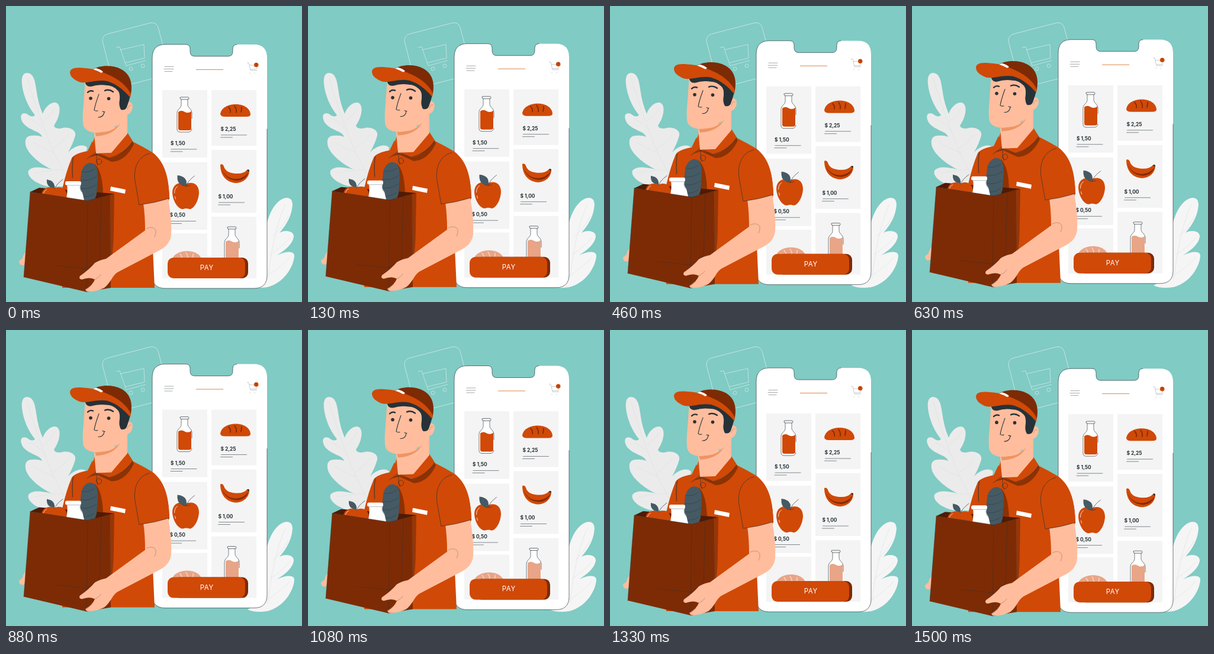
Write an HTML page that moves like this. It is 500x500 px and loops after 1540 ms.

```html
<!DOCTYPE html>
<html lang="en">
<head>
<meta charset="utf-8">
<title>Grocery delivery</title>
<style>
html, body { margin: 0; width: 100%; height: 100%; overflow: hidden; background: #80cbc4; }
svg { display: block; width: 100vw; height: 100vh; }
.o { fill: #d04907; }
.b { fill: #7d2b05; }
.d { fill: #263238; }
.g { fill: #455a64; }
.s { fill: #ffbd9d; }
.w { fill: #fff; }
.pale { fill: #e8a587; }
.card { fill: #f4f4f4; }
.shade { fill: #8c3204; }
.ln { fill: none; stroke: #263238; stroke-width: .65; stroke-linecap: round; stroke-linejoin: round; }
.soft { fill: none; stroke: #dcdfdf; stroke-width: .6; }
.icon { fill: none; stroke: #cfe9e6; stroke-width: .8; }
text { font-family: Inter, "Open Sans", sans-serif; }
.price { font-size: 8.4px; font-weight: 650; fill: #263238; }
.pay { font-size: 11.4px; letter-spacing: .6px; }
</style>
</head>
<body>
<svg id="stage" viewBox="0 0 500 500" xmlns="http://www.w3.org/2000/svg"></svg>
<script>
const LOOP = 1540, LOWEST = 1485, RISE = 8.9;

const path = (cls, d, extra = '') => `<path class="${cls}" d="${d}" ${extra}/>`;
const rect = (cls, x, y, w, h, r = 0) =>
  `<rect class="${cls}" x="${x}" y="${y}" width="${w}" height="${h}" rx="${r}"/>`;
const dot = (cls, x, y, r) => `<circle class="${cls}" cx="${x}" cy="${y}" r="${r}"/>`;
const shift = (x, y, body) => `<g transform="translate(${x} ${y})">${body}</g>`;

const bottle = liquid =>
  path('w', 'M6 4H19V13C19 19 25 20 25 27V55Q25 59 20 59H5Q0 59 0 55V27C0 20 6 19 6 13Z') +
  path(liquid, 'M2 25Q7 21 13 25Q19 28 24 24V53Q24 56 20 56H6Q2 56 2 53Z') +
  path('ln', 'M5 1Q5 0 7 0H18Q20 0 20 2Q20 4 18 4H7Q5 4 5 1M7 4V13C7 19 0 20 0 27V54Q0 59 5 59H19Q24 59 25 54M18 4V13C18 18 25 20 25 27V36');

const bread = (fill, cut) =>
  path(fill, 'M0 16C2 5 14 0 26 0C39 0 50 6 51 17Q51 21 44 21H8Q0 21 0 16Z') +
  path('', 'M14 5Q18 9 17 14M24 3Q28 8 27 14M36 5Q36 9 35 13',
    `fill="none" stroke="${cut}" stroke-width="1.7" stroke-linecap="round"`);

const apple =
  path('o', 'M23 15C30 11 45 11 45.5 29C45 44 36 58 29 57Q24 55 19 57C10 58 1 43 .5 29C1 12 16 11 23 15Z') +
  path('g', 'M9 0Q8 12 15 16Q20 18 24 17Q26 7 19 3Q14 0 9 0Z') +
  path('ln', 'M24 18Q26 10 38 1M18 17Q24 20 30 17') +
  path('', 'M4 30Q4 22 9 19M5 36L6 40', 'fill="none" stroke="#fff" stroke-width=".8" stroke-linecap="round"');

const banana =
  path('o', 'M362 268Q366 266 368 271C371 281 381 283 391 283Q402 283 407 277Q410 275 411 278C411 289 402 299 388 299C372 298 362 286 362 268Z') +
  path('b', 'M364 275C369 287 379 293 391 292Q404 290 410 280C407 289 401 294 390 295C377 294 368 287 364 275Z') +
  path('d', 'M407 277Q410 275 411 278L410 280Z');

const price = (x, y, label) =>
  `<text class="price" x="${x}" y="${y}">${label}</text>` +
  path('ln', `M${x + 1} ${y + 7}h43M${x} ${y + 11}h20`, 'stroke-opacity=".85"');

const cards = [
  [264, 142, 114], [264, 264, 114], [264, 384, 76],
  [347, 142, 94], [347, 243, 106], [347, 356, 104]
].map(([x, y, h]) => rect('card', x, y, 76, h)).join('');

function leaves() {
  return path('', 'M35 113C46 113 49 125 51 140Q54 164 62 182C66 170 78 160 86 164C94 169 91 188 81 202Q83 209 96 206C108 204 119 210 117 219Q113 233 105 247C116 236 130 232 137 239L125 305H72C55 302 34 290 38 278Q45 268 77 276C60 268 40 253 34 238Q29 220 43 219Q54 218 61 221C58 211 40 211 29 198C22 187 25 179 35 182Q45 190 49 184C40 174 29 153 27 132Q25 114 35 113Z', 'fill="#ebebeb"') +
    path('soft', 'M36 122C48 165 64 205 77 240Q91 270 104 290M63 194Q76 186 83 172M40 190Q55 196 67 212M78 241Q94 232 105 217M45 230Q65 242 82 248M48 282Q75 277 97 276') +
    path('', 'M408 472C425 465 431 440 434 415C436 365 449 333 469 325Q483 321 484 335C483 352 476 367 462 383C472 377 487 380 486 390C484 402 472 412 458 421C472 414 487 413 487 422C486 440 470 468 441 475Q420 478 408 472Z', 'fill="#f5f5f5"') +
    path('soft', 'M472 335C459 363 450 400 442 462M450 390Q464 378 477 355M446 420Q465 408 480 391M441 456Q464 442 480 424');
}

function cartTile() {
  return `<rect class="icon" x="170.5" y="36.5" width="97" height="92" rx="11" transform="rotate(-14.5 219 82.5)"/>` +
    path('icon', 'M186 70L192 69L203 101L236 92M193 74L233 65L234 88L201 96') +
    dot('icon', 211, 106, 3) + dot('icon', 231, 101, 3);
}

function phone() {
  const outline = 'M441 208V455Q441 477 419 477H269Q247 477 247 455V88Q247 65 269 65H304Q311 65 311 73V77Q311 85 319 85H375Q383 85 383 77V73Q383 65 390 65';
  return path('w', outline + 'H419Q441 65 441 88Z') + path('ln', outline) +
    path('ln', 'M268 102.5h15M267 106.5h16M268 110.5h13', 'stroke-opacity=".65"') +
    path('', 'M321 107.5h46', 'stroke="#dc864f" stroke-width="1"') +
    path('soft', 'M407 96h3l3 13h11M411 100h13l-1 7h-10', 'style="stroke:#aaa"') +
    dot('soft', 412, 113.5, 1.1) + dot('soft', 420, 113.5, 1.1) +
    dot('o', 422.7, 99.5, 3.8) +
    '<text x="422.7" y="101.2" font-size="4.5" text-anchor="middle" fill="#5a1d02">1</text>' +
    cards +
    shift(289, 154, bottle('o')) + shift(369, 373, bottle('pale')) +
    shift(362, 166, bread('o', '#7d2b05')) + shift(280, 414, bread('pale', '#f6cdbb')) +
    shift(280.5, 286, apple) + banana +
    price(278, 235, '$ 1,50') + price(362.5, 211, '$ 2,25') +
    price(276.5, 356.5, '$ 0,50') + price(358.5, 325, '$ 1,00') +
    rect('b', 283, 425, 126, 35, 10) + rect('o', 273, 425, 131, 35, 10) +
    '<text class="w pay" x="339.3" y="446" text-anchor="middle">PAY</text>';
}

function head() {
  return path('s', 'M148 205H186L205 160V216L178 248L152 249Z') +
    path('', 'M150 212Q177 217 193 198Q183 218 152 220Z', 'fill="#ed9564"') +
    path('s', 'M200 168Q207 158 213 165C216 172 211 185 201 184Z') +
    path('ln', 'M205 174Q207 167 211 168', 'stroke-opacity=".4"') +
    path('s', 'M134 123L204 130L204 170C202 192 184 211 155 214C139 214 130 208 130 197Q129 185 131 166Z') +
    path('d', 'M134 123Q151 120 176 124L211 148Q208 160 204 171Q201 177 194 175Q190 168 192 158Q193 146 188 142Q180 134 170 134Q156 132 144 136Q136 137 134 130Z') +
    path('o', 'M108 113C108 104 118 102 149 107L207 126Q213 140 210 155C200 143 188 132 171 127C149 123 133 135 119 126Q109 121 108 113Z') +
    path('b', 'M147 107C156 101 178 98 195 107C211 116 214 132 211 149C202 130 181 116 147 107Z') +
    path('w', 'M147 107L152 105Q160 107 164 111L161 113Q154 109 147 107Z') +
    dot('d', 143, 156, 2.8) + dot('d', 173.5, 156.5, 2.8) +
    path('', 'M138 146Q142 142 147 144M167 143Q174 140 181 145',
      'fill="none" stroke="#263238" stroke-width="2.4" stroke-linecap="round"') +
    path('ln', 'M157 149Q151 165 149 176Q151 178 155 177M156 188Q165 188 166 179M163 178L167 179', 'style="stroke-width:1.1"');
}

function shirt() {
  return path('o', 'M146 228L138 245Q116 249 111 257Q102 278 95 309V476H251L248 410L276 325C275 288 268 263 247 247Q232 238 214 229L203 211Q182 234 152 246Z') +
    path('shade', 'M139 256L152 249L176 257Q201 251 211 225L216 233C207 253 193 263 178 263L154 252Z') +
    path('o', 'M150 221L137 258L152 247L174 257Q202 248 214 228L203 211Q181 234 152 244L154 227Z') +
    path('ln', 'M137 258L152 247L174 257Q201 250 214 229M152 246Q157 232 151 224M114 255Q110 270 113 289M153 249Q152 258 155 269') +
    dot('ln', 157, 263, 4.6) +
    path('w', 'M177 305L202 310L201 317L176 312Z') +
    path('shade', 'M150 267Q163 279 164 318H150Z') +
    path('', 'M175 319L183 317L182 375Q182 410 177 438Z', 'fill="#973607"');
}

function bag() {
  return path('s', 'M35 415Q29 418 28 426L22 431Q22 438 28 438L35 436Z') +
    path('', 'M41 314L56 307L183 317L136 330Z', 'fill="#511a03"') +
    shift(60, 292, path('o', 'M22 16C33 11 43 17 43 29L40 37H2Q0 30 0 25C3 14 15 12 22 16Z') +
      path('g', 'M9 1Q8 11 15 14L22 16Q23 7 16 3Z') +
      path('ln', 'M22 17Q25 9 36 1') +
      path('', 'M3 25Q5 19 9 18', 'fill="none" stroke="#fff" stroke-width=".7"')) +
    path('g', 'M122 330L127 282C130 267 142 261 150 268C157 276 155 295 153 318L148 333Z') +
    path('ln', 'M128 280Q139 283 150 275M127 294Q139 297 153 288M126 308Q139 311 153 302M128 322Q138 324 149 317M113 257L112 291', 'stroke-opacity=".65"') +
    path('w', 'M103 302H126Q124 309 129 315L133 332L101 329Q105 312 103 302Z') +
    rect('w', 100, 296, 27, 7, 3) +
    path('ln', 'M102 303H125M125 305Q124 311 129 316', 'stroke-opacity=".5"') +
    path('b', 'M41 314L138 329L175 319L177 476L136 483L30 458Z') +
    path('ln', 'M41 314L138 329L136 483M138 329L175 319L177 440M41 314L30 458M161 324L158 428L137 456M83 438L136 444L158 428', 'stroke-opacity=".65"');
}

function arm() {
  return path('s', 'M232 333L274 325C278 347 280 370 279 385C278 401 268 409 253 416L188 450C179 456 176 469 166 476Q150 484 136 482L134 479Q147 471 150 462Q142 457 128 462Q122 461 125 456Q141 445 150 434Q158 429 169 427L235 379Q235 355 232 333Z') +
    path('ln', 'M237 376Q249 371 253 379Q254 385 251 390M150 462Q157 459 160 454M135 480L145 471', 'stroke-opacity=".45"') +
    path('o', 'M243 247C223 254 215 273 218 296L225 336Q251 333 276 325C275 291 268 263 247 248Z') +
    path('ln', 'M243 249C223 254 215 273 218 296L225 336Q251 333 276 325');
}

const stage = document.getElementById('stage');
stage.innerHTML = '<rect width="500" height="500" fill="#80cbc4"/>' + leaves() + cartTile() +
  `<g id="float">${phone()}${shirt()}${head()}${bag()}${arm()}</g>`;
const float = document.getElementById('float');

// Up and down once per loop, a little straighter than a sine.
function lift(t) {
  const p = ((t - LOWEST + LOOP) % LOOP) / LOOP;
  const u = 1 - Math.abs(1 - 2 * p);
  return RISE * (.3 * u + .35 * (1 - Math.cos(Math.PI * u)));
}

function draw(t) {
  float.setAttribute('transform', `translate(0 ${(.2 - lift(t)).toFixed(2)})`);
}

const start = performance.now();
function tick(now) {
  draw(Math.max(0, now - start) % LOOP);
  requestAnimationFrame(tick);
}
draw(0);
requestAnimationFrame(tick);
</script>
</body>
</html>
```
